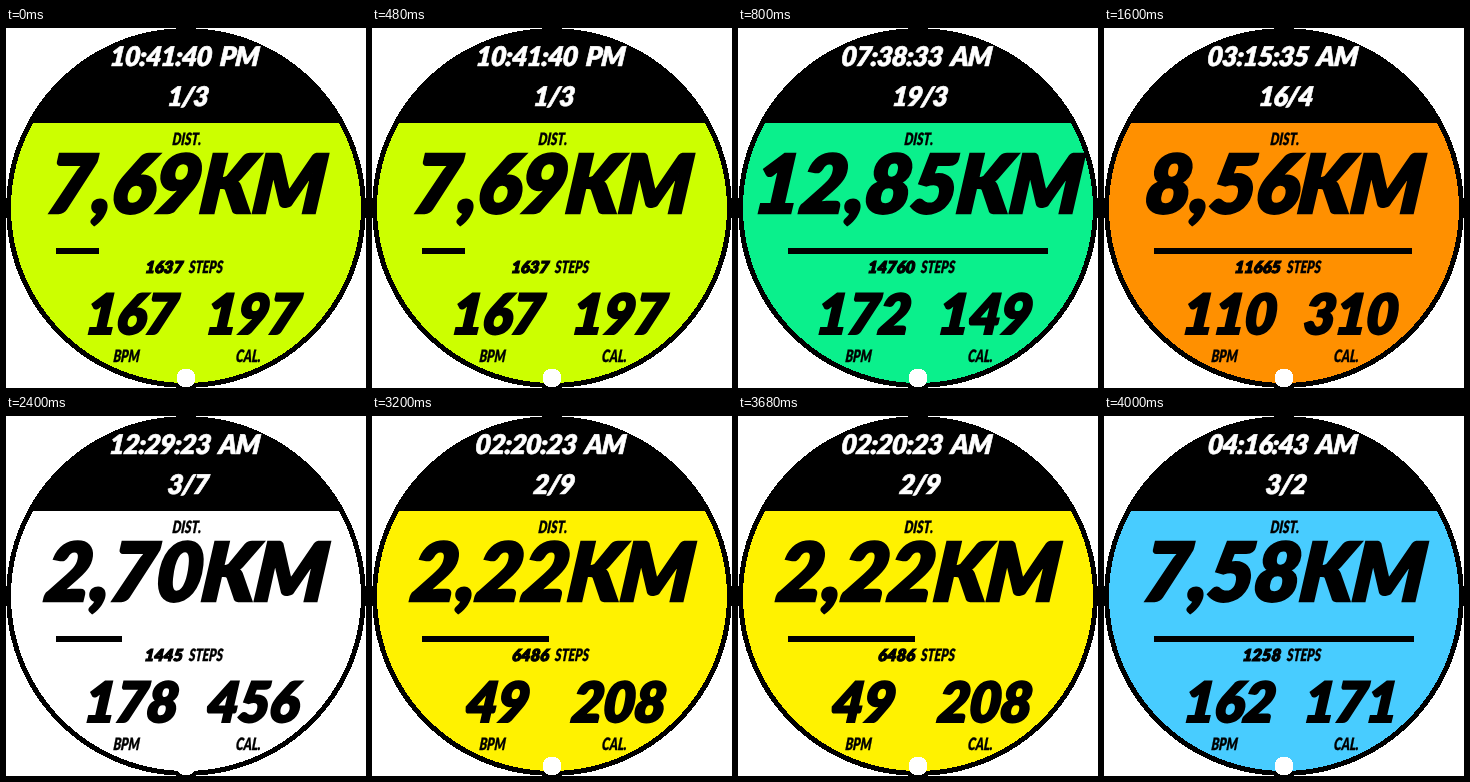
An HTML page for the animation above (4800 ms loop, 360 by 360 pixels).

```html
<!DOCTYPE html>
<html lang="en">
<head>
<meta charset="utf-8">
<title>Watch face</title>
<style>
  html, body { margin: 0; width: 100%; height: 100%; overflow: hidden; background: #fff; }
  svg { display: block; width: 360px; height: 360px; shape-rendering: crispEdges; }
  text { font: italic 900 17px Lato, sans-serif; font-kerning: none; text-anchor: middle; stroke: #000; stroke-width: .3px; }
  .clock { font-size: 27px; letter-spacing: -.9px; word-spacing: 4px; fill: #fff; stroke: #fff; stroke-width: .7px; }
  .dist { font-size: 81px; letter-spacing: -1px; stroke-width: 2.5px; }
  .stat { font-size: 55.5px; letter-spacing: -1px; stroke-width: 2px; }
  .steps { font-size: 16.5px; text-anchor: end; stroke-width: 1.2px; }
</style>
</head>
<body>
<svg viewBox="0 0 360 360">
  <circle cx="180" cy="180" r="180"/>
  <path id="panel" d="M27 95A175 175 0 1 0 333 95Z"/>
  <rect id="bar" x="50" y="220" height="6"/>
  <circle cx="180" cy="350" r="9.5" fill="#fff"/>
</svg>
<script>
const HOLD = 800;
// colour, time, date, distance, bar width, steps, bpm, calories
const screens = [
  ['#ccff00', '10:41:40 PM', '1/3', '7,69', 43, 1637, 167, 197],
  ['#0af08c', '07:38:33 AM', '19/3', '12,85', 260, 14760, 172, 149],
  ['#ff9000', '03:15:35 AM', '16/4', '8,56', 258, 11665, 110, 310],
  ['#ffffff', '12:29:23 AM', '3/7', '2,70', 66, 1445, 178, 456],
  ['#fff200', '02:20:23 AM', '2/9', '2,22', 127, 6486, 49, 208],
  ['#48ccff', '04:16:43 AM', '3/2', '7,58', 260, 1258, 162, 171]
];

const svg = document.querySelector('svg');
const panel = document.getElementById('panel');
const bar = document.getElementById('bar');

function addText(x, y, style, content = '', condense = 1) {
  const node = document.createElementNS(svg.namespaceURI, 'text');
  node.setAttribute('class', style);
  node.setAttribute('transform', `translate(${x} ${y}) skewX(-6) scale(${condense} 1)`);
  node.textContent = content;
  svg.append(node);
  return node;
}

const addLabel = (x, y, content) => addText(x, y, 'label', content, .73);

addLabel(180.5, 117, 'DIST.');
addLabel(199.5, 245, 'STEPS');
addLabel(120, 334, 'BPM');
addLabel(242, 334, 'CAL.');

const clock = addText(177.5, 38, 'clock');
const date = addText(181, 78, 'clock');
const dist = addText(177.5, 185, 'dist');
const steps = addText(176.5, 245, 'steps');
const bpm = addText(123.5, 306, 'stat');
const cal = addText(245, 306, 'stat');

let shown = -1;
function draw() {
  const index = Math.floor(performance.now() / HOLD) % screens.length;
  if (index !== shown) {
    shown = index;
    const [color, time, day, km, width, stepCount, pulse, energy] = screens[index];
    panel.setAttribute('fill', color);
    bar.setAttribute('width', width);
    clock.textContent = time;
    date.textContent = day;
    dist.textContent = km + 'KM';
    steps.textContent = stepCount;
    bpm.textContent = pulse;
    cal.textContent = energy;
  }
  requestAnimationFrame(draw);
}
draw();
</script>
</body>
</html>
```
